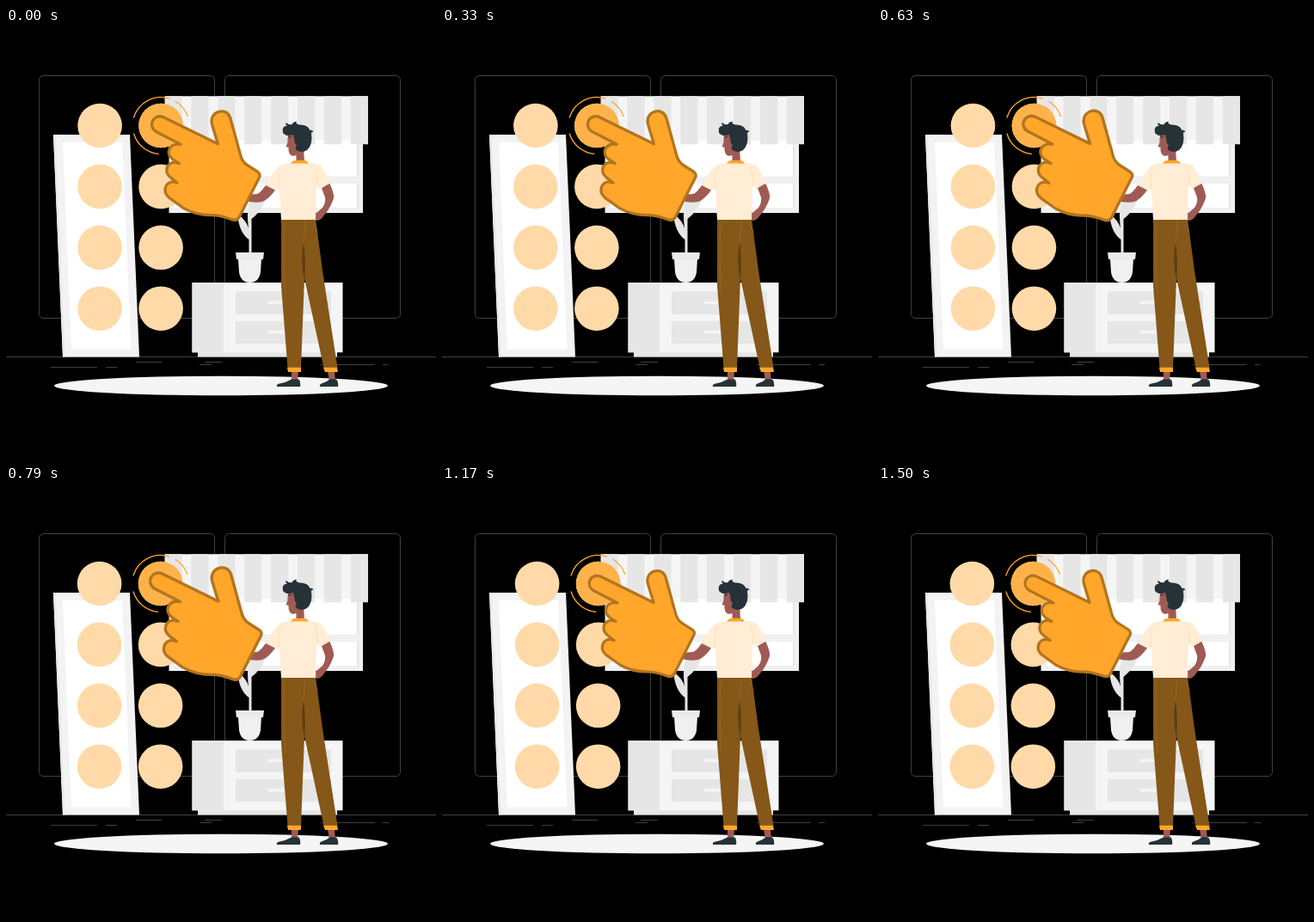
These frames come from a looping animation (500 px wide and 500 px high, 1.54 s). An HTML page:

```html
<!DOCTYPE html>
<html lang="en">
<head>
<meta charset="utf-8">
<style>
  html, body { margin: 0; width: 100%; height: 100%; overflow: hidden; background: #000; }
  svg { display: block; width: 100%; height: 100%; }
</style>
</head>
<body>
<svg viewBox="0 0 500 500">
  <g id="room" fill="none" stroke="#404040">
    <rect x="38.5" y="55.5" width="204" height="282" rx="5"/>
    <rect x="254.5" y="55.5" width="204" height="282" rx="5"/>
    <path d="M0 382.5H500M151 388.5H181M231 388.5H251M225 391.5H239M366 391.5H429M438 391.5H445M52 394.5H106M116 394.5H129"/>
  </g>

  <g id="window">
    <path fill="#f0f0f0" d="M189.5 120H415V215H189.5z"/>
    <path fill="#fff" d="M196 131H408V172.500H196zM196 181H408V209H196z"/>
    <path fill="#e6e6e6" d="M408 131h2v41.500h-2zM408 181h2v28h-2z"/>
    <path fill="#f5f5f5" d="M185 79.300H421V131H185z"/>
    <g id="stripes" fill="#e6e6e6"></g>
  </g>

  <g id="mirror">
    <path fill="#f3f3f3" d="M55 124H144L155 382.500H66z"/>
    <path fill="#e9e9e9" d="M55 124H57.500L68.500 382.500H66z"/>
    <path fill="#fff" d="M66 133H135L145.500 373.500H76z"/>
  </g>

  <g id="cabinet">
    <path fill="#e6e6e6" d="M223 377H385V382.500H223z"/>
    <path fill="#f5f5f5" d="M216.500 296H391.500V377.300H216.500z"/>
    <path fill="#e6e6e6" d="M216.500 296H253V377.300H216.500zM267 306.300H378V333H267zM267 340.700H378V367.300H267z"/>
    <path stroke="#f5f5f5" stroke-width="3.600" stroke-linecap="round" d="M306 319.300H340M306 353.800H340"/>
  </g>

  <g id="plant" fill="#e6e6e6">
    <path d="M282.500 262V246Q271 238 269 216Q283 226 283 240Q279 215 283 203Q290 194 305 189Q301 210 285.500 222V262z"/>
    <path fill="#f0f0f0" d="M270 268H297L296 284Q294 296 283.500 296Q273 296 271 284z"/>
    <path fill="#ebebeb" d="M267 261H300L299 269H268z"/>
  </g>

  <ellipse cx="250" cy="416" rx="194" ry="11.300" fill="#f5f5f5"/>

  <g id="person">
    <g fill="#9f5b53">
      <path d="M304 180Q296 192 292 193L278 194V201Q290 204 298 202Q306 199 314 187zM367 186L376 180Q382 193 381 198Q377 210 369 219Q366 224 360 224V216L368 209Q372 203 371 197z"/>
      <path d="M329 121Q327 129 327.500 133L325.500 138L328.500 139Q328 146 332 148.500Q335 149 337.500 148V155H347L346 138L342 122z"/>
      <path d="M332 399H340L339 411H332zM374 399H382L383 411H376z"/>
    </g>
    <path fill="#263238" d="M322 122Q320 114 327 113.500Q324 112 326 110Q328 113 333 112Q332 110 338 108.500Q336 111 341 112.500Q351 112 353.500 119Q356 118 357.500 121Q355 120.500 355 122Q357 136 350 142Q343 146 337 141.500Q336 139 338 136Q335 134 335.500 130L334 124Q326 127 322 122z"/>
    <path fill="none" stroke="#263238" d="M328 127.500L332 126"/>
    <g fill="#263238">
      <path d="M315 417Q314 414 318 413.500Q326 412 332 408.500L340.500 408.500Q343 412 342 417z"/>
      <path d="M365 417Q364 414 368 413Q374 411 377 408L384 408.500Q387 412 386 417z"/>
    </g>
    <path fill="#855718" d="M320 222H360L368 282L385.500 395H369.500L347 291L343 395H327.500L320 300z"/>
    <path fill="#5d3d11" d="M346 249Q342 270 347 293Q349 270 346 249z"/>
    <path fill="none" stroke="#a06f2b" stroke-width=".6" d="M324 224Q322 270 325 310M358 224Q359 234 363 238M346 249L348 225"/>
    <path fill="#ffa62b" d="M327 394.700H343V400H328zM369 394.700H385L386 400H371z"/>
    <path fill="#ffedd5" d="M332 157H352Q361 157 366 160Q372 168 377 180.500L365 187L361 183L360 223H320L317.500 186L314 189L302 183Q309 169 316 162Q322 157 332 157z"/>
    <path fill="none" stroke="#ffdaa8" stroke-width=".8" d="M319 164Q316 176 317.500 188M361 184Q363 172 359 161"/>
    <path fill="#ffa62b" d="M331 157.500Q333 153.500 338 153.700H347Q350 154 352 157.500z"/>
  </g>

  <g id="dots" fill="#ffdaa8">
    <g id="column"></g>
    <circle cx="180.400" cy="113.500" r="25.800" fill="#ffb24a"/>
    <path fill="none" stroke="#ffa62b" stroke-width="1.300" stroke-linecap="round" transform="translate(180.400 113.500)"
      d="M-31.600 -9.500A33 33 0 0 1 10 -31.400M17.500 -28A33 33 0 0 1 31 -11M-31.500 9.500A33 33 0 0 0 -3 32.900"/>
  </g>

  <path id="hand" fill="#ffa62b" stroke="#b2741e" stroke-width="3.200" stroke-linejoin="round"
    d="M246 135.500L239.200 113C236 98 256 93 260 106L271 146Q273 156 280 160L291 167Q295 170 292.500 174L270 218.500Q267 223 262 221Q249 216 239 216Q221 216 207 208L191 196.500C182 189 187 177 197 178.500L200 179.500L193 174C184 167 188 155 199 156.500L202 157.500L195 153C186 146 191 134 204 136L176 121.500C166 115 173 101 184 105z"/>
</svg>
<script>
  const PERIOD = 1540, PHASE = 0.027;
  const SHAKE = [[0, 0], [.1, -1], [.2, 2], [.3, -4], [.4, 4], [.5, -4], [.6, 4], [.7, -4], [.8, 2], [.9, -1], [1, 0]];
  const BEAT = [[0, 1], [.1, 1.1], [.3, 1], [.4, 1], [.5, 1.1], [.6, 1], [1, 1]];
  const byId = id => document.getElementById(id);

  byId('stripes').innerHTML = Array.from({ length: 8 }, (_, i) =>
    `<path d="M${184.500 + i * 30.900} 79.300h20.200v56h-20.200z"/>`).join('');
  byId('column').innerHTML = [109.4, 180.4].map(x => [0, 1, 2, 3].map(row =>
    `<circle cx="${x}" cy="${113.5 + row * 70.9}" r="25.800"/>`).join('')).join('');

  // Linear interpolation through [position, value] keys.
  function sample(keys, p) {
    const i = keys.findIndex(key => key[0] > p);
    const [a, from] = keys[i - 1], [b, to] = keys[i];
    return from + (to - from) * (p - a) / (b - a);
  }

  function draw(now) {
    const p = (now / PERIOD + PHASE) % 1;
    byId('dots').setAttribute('transform', `translate(${sample(SHAKE, p)} 0)`);
    byId('hand').setAttribute('transform',
      `translate(232.300 160) scale(${sample(BEAT, p)}) translate(-232.300 -160)`);
  }

  const start = performance.now();
  function tick() {
    draw(performance.now() - start);
    requestAnimationFrame(tick);
  }
  tick();
</script>
</body>
</html>
```
